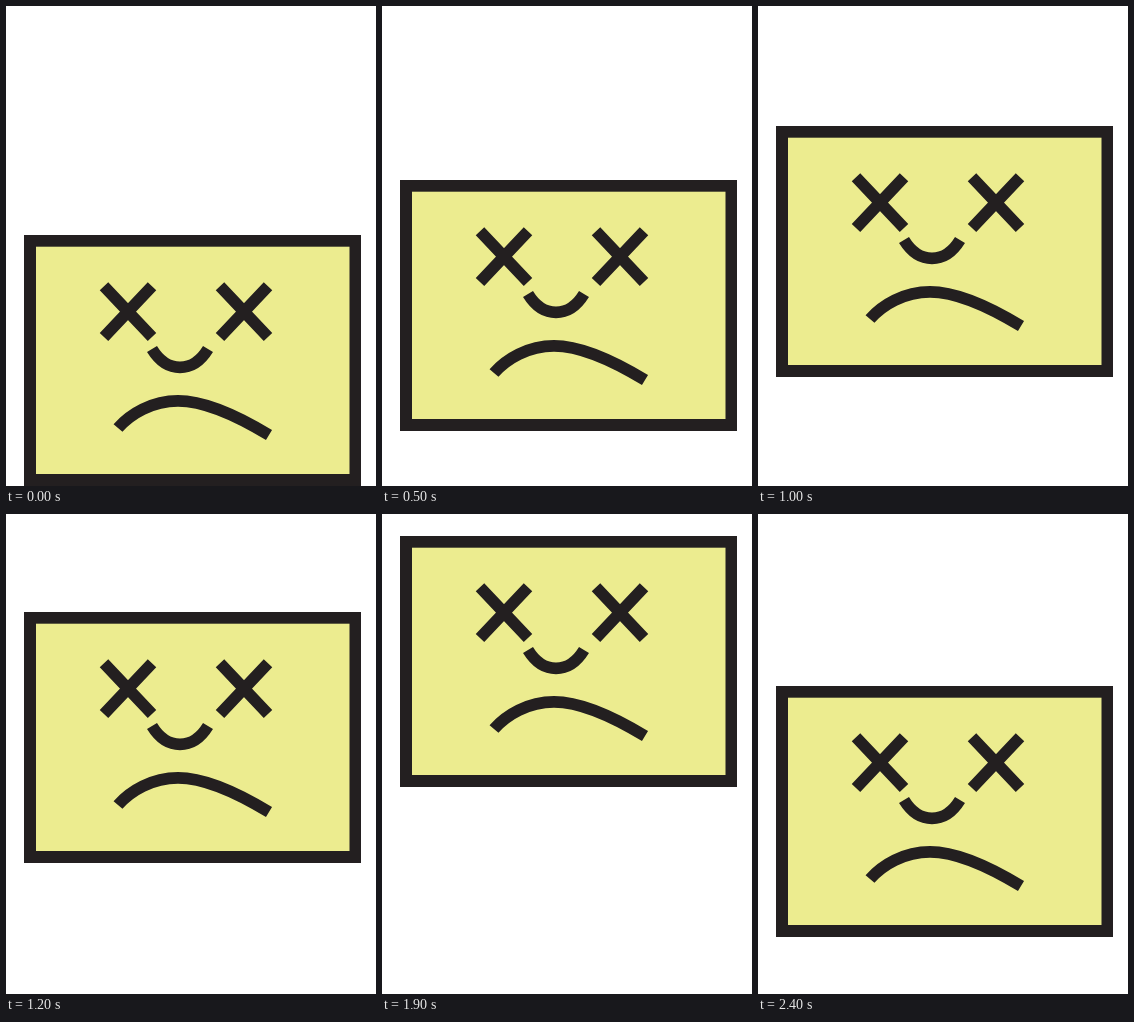
Animation of 370x480 px, one loop 2500 ms. Source, as an HTML page:

```html
<!DOCTYPE html>
<html lang="en">
<head>
<meta charset="utf-8">
<title>Falling face</title>
<style>
  html, body { margin: 0; width: 100%; height: 100%; overflow: hidden; background: #fff; }
  svg { display: block; position: absolute; left: 0; top: 0; }
  path { fill: none; stroke: #231f20; stroke-width: 11.7; }
</style>
</head>
<body>
<svg width="370" height="480" viewBox="0 0 370 480">
  <g id="card">
    <rect x="18" width="337" height="251" fill="#231f20"/>
    <rect x="30" y="11.7" width="313.5" height="227.3" fill="#ecec8f"/>
    <path d="M98 51.3L146 102M146 51.3L98 102"/>
    <path d="M214 51.3L262 102M262 51.3L214 102"/>
    <path d="M146 114C161 138.5 187 138.5 202 114"/>
    <path d="M112 193C124 179 146 165.8 172 165.8C200 165.8 235 183 263 200"/>
  </g>
</svg>
<script>
  const STEPS = 25, STEP_MS = 100;
  const LOW = 229;      // top edge of the card at rest
  const RISE = 21;      // steps up; the rest bring it back down

  const topAt = i => Math.round(i <= RISE
    ? LOW * (1 - i / RISE)
    : LOW * (i - RISE) / (STEPS - RISE));

  const frames = Array.from({ length: STEPS + 1 }, (_, i) => ({
    offset: i / STEPS,
    transform: `translateY(${topAt(i)}px)`,
    easing: 'step-end'
  }));

  document.getElementById('card').animate(frames, {
    duration: STEPS * STEP_MS,
    iterations: Infinity
  });
</script>
</body>
</html>
```
